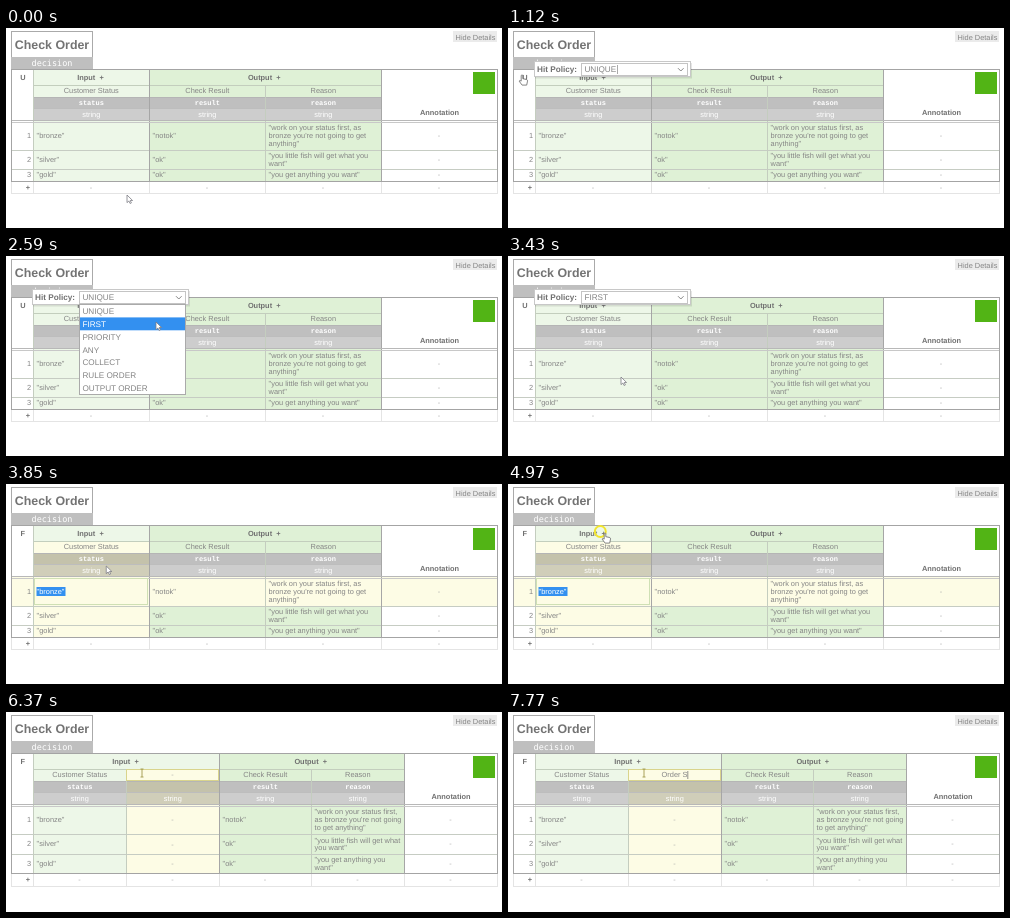
Animation, 496 px wide and 200 px high, one loop 8 s. Source, as an HTML page:

```html
<!DOCTYPE html>
<html lang="en">
<head>
<meta charset="utf-8">
<title>Decision table editor</title>
<style>
  html, body { margin: 0; width: 100%; height: 100%; overflow: hidden; background: #fff; }
  svg { display: block; width: 496px; height: 200px; }
  text { font: 7.4px "Liberation Sans", Arial, sans-serif; fill: #858585; text-rendering: geometricPrecision; white-space: pre; }
  .bold { font-weight: bold; fill: #707070; }
  .title { font-size: 12.4px; fill: #737373; }
  .big { font-size: 8.2px; }
  .mono { font: bold 7px "Liberation Mono", monospace; fill: #fff; }
  .tab { font: 8.5px "DejaVu Sans Mono", monospace; }
  .white { fill: #fff; }
  .faint { fill: #aaa; }
</style>
</head>
<body>
<svg id="stage" viewBox="0 0 496 200"></svg>
<script>
const LOOP = 8000, STEP = 70;
const GREEN_IN = '#edf7e8', GREEN_OUT = '#dff1d6', YELLOW = '#fdfce5';
const stage = document.getElementById('stage');
const pen = document.createElement('canvas').getContext('2d');
pen.font = '7.4px "Liberation Sans", Arial, sans-serif';

const rect = (x, y, x2, y2, fill, extra = '') =>
  `<rect x="${x}" y="${y}" width="${x2 - x}" height="${y2 - y}" fill="${fill}" ${extra}/>`;
const frame = (x, y, x2, y2, color, fill = 'none') =>
  rect(x + .5, y + .5, x2 + .5, y2 + .5, fill, `stroke="${color}"`);
const hLine = (x, x2, y, color) => rect(x, y, x2, y + 1, color);
const vLine = (x, y, y2, color) => rect(x, y, x + 1, y2, color);
const label = (x, y, text, cls = '', anchor = 'middle') =>
  `<text x="${x}" y="${y}" class="${cls}" text-anchor="${anchor}">${text}</text>`;

const input = (name, variable, cells) => ({ name, variable, cells, fill: GREEN_IN });
const output = (name, variable, cells) => ({ name, variable, cells, fill: GREEN_OUT });
const status = input('Customer Status', 'status', ['"bronze"', '"silver"', '"gold"']);
const result = output('Check Result', 'result', ['"notok"', '"ok"', '"ok"']);

const narrow = {
  edges: [27, 143, 259, 375, 491], rows: [93, 122, 141, 153], foot: 165, inputs: 1,
  columns: [status, result, output('Reason', 'reason', [
    '"work on your status first, as|bronze you\'re not going to get|anything"',
    '"you little fish will get what you|want"',
    '"you get anything you want"'])]
};
const wide = {
  edges: [27, 120, 213, 305, 398, 491], rows: [93, 122, 142, 161], foot: 174, inputs: 2,
  columns: [status, input('', '', ['-', '-', '-']), result, output('Reason', 'reason', [
    '"work on your status first,|as bronze you\'re not going|to get anything"',
    '"you little fish will get what|you want"',
    '"you get anything you|want"'])]
};

function cellText(x, x2, top, bottom, text) {
  const mid = (top + bottom) / 2;
  if (text === '-') return label((x + x2) / 2, mid + 2.6, '-', 'faint');
  const lines = text.split('|');
  return lines.map((line, i) =>
    label(x + 3.6, mid + 2.4 + (i - (lines.length - 1) / 2) * 7.6, line, '', 'start')).join('');
}

function drawTable(table, policy, focusCol, focusRow) {
  const { edges, rows, foot, columns, inputs } = table;
  const last = columns.length, bottom = rows[3], right = edges[last], split = edges[inputs];
  let out = rect(27, 41, split, 57, GREEN_IN) + rect(split, 41, right, 57, GREEN_OUT);

  columns.forEach((col, c) => {
    const lit = c === focusCol;
    out += rect(edges[c], 57, edges[c + 1], bottom, lit ? YELLOW : col.fill) +
      rect(edges[c], 69, edges[c + 1], 80, lit ? '#c4c2ab' : '#bfbfbf') +
      rect(edges[c], 80, edges[c + 1], 92, lit ? '#d0ceb9' : '#cdcdcd');
  });
  if (focusRow >= 0) out += rect(5, rows[focusRow], 491, rows[focusRow + 1], YELLOW);
  columns.forEach((col, c) => {
    const x = edges[c], x2 = edges[c + 1], mid = (x + x2) / 2 + .3;
    out += label(mid, 65.3, col.name) + label(mid, 77, col.variable, 'mono') + label(mid, 88.6, 'string', 'white');
    col.cells.forEach((text, r) => out += cellText(x, x2, rows[r], rows[r + 1], text));
  });

  out += hLine(27, right, 57, '#c3cebd') + hLine(27, right, 69, '#b5b5b5') + hLine(27, right, 80, '#bdbdbd');
  rows.slice(1, 3).forEach(y => out += hLine(5, 491, y, '#c6ccc3'));
  edges.forEach((x, i) => {
    const strong = i === inputs || i === last;
    out += vLine(x, i && !strong ? 57 : 41, bottom, strong ? '#a6a6a6' : '#c4cdbf');
    out += vLine(x, bottom, foot, '#e4e4e4');
  });
  out += hLine(5, 491, 92, '#b8b8b8') + hLine(5, 491, 94, '#c8c8c8');
  out += frame(5, bottom, 491, foot, '#e4e4e4') + frame(5, 41, 491, bottom, '#a4a4a4');

  out += label(16.8, 51.6, policy, 'bold');
  out += label((27 + split) / 2 - .5, 51.6, 'Input\u00a0\u00a0+', 'bold');
  out += label((split + right) / 2 - .8, 51.6, 'Output\u00a0\u00a0+', 'bold');
  const noteX = (right + 491) / 2;
  out += label(noteX + .5, 87.4, 'Annotation', 'bold') + rect(467, 44, 489, 66, '#52b415');
  for (let r = 0; r < 3; r++) {
    const y = (rows[r] + rows[r + 1]) / 2 + 2.4;
    out += label(25, y, r + 1, '', 'end') + label(noteX, y, '-', 'faint');
  }
  const footY = (bottom + foot) / 2 + 2.6;
  out += label(22, footY, '+', 'bold');
  [...edges.slice(1), 491].forEach((x2, i) => {
    if (x2 > edges[i]) out += label((edges[i] + x2) / 2, footY, '-', 'faint');
  });
  return out;
}

function drawHeader() {
  return frame(5, 3, 86, 29, '#aaa', '#fff') + label(46, 21.1, 'Check Order', 'bold title') +
    rect(5, 29, 87, 41, '#bfbfbf') + label(46, 38.2, 'decision', 'mono tab') +
    rect(447, 3, 491, 14, '#ebebeb') + label(469.5, 11.6, 'Hide Details');
}

const policies = ['UNIQUE', 'FIRST', 'PRIORITY', 'ANY', 'COLLECT', 'RULE ORDER', 'OUTPUT ORDER'];
function drawPopup(t) {
  let out = rect(27, 35, 184, 50.5, '#000', 'opacity=".1"') + frame(26, 33, 182, 48, '#c8c8c8', '#fff') +
    label(29, 44.2, 'Hit Policy:', 'bold big', 'start') + frame(73, 35, 179, 47, '#c4c4c4', '#fff') +
    label(76.4, 44.2, t < 2800 ? 'UNIQUE' : 'FIRST', 'big', 'start') +
    '<path d="M170 40.2l2.8 2.8 2.8-2.8" fill="none" stroke="#888"/>';
  if (t < 1550) out += vLine(109, 37, 46, '#aaa');
  if (t >= 2240 && t < 2800) {
    const hover = t < 2450 ? 0 : 1;
    out += frame(73, 48, 179, 138, '#aaa', '#fff');
    policies.forEach((name, i) => {
      const y = 48.5 + i * 12.9;
      if (i === hover) out += rect(74, y, 179, y + 12.9, '#3390f0');
      out += label(76.4, y + 9.3, name, i === hover ? 'big white' : 'big', 'start');
    });
  }
  return out;
}

// time, x, y of the pointer tip
const path = [
  [0, 121, 167], [840, 14, 47], [1260, 14, 47], [1960, 171, 42], [2240, 171, 42], [2590, 150, 66],
  [3080, 150, 66], [3430, 113, 121], [3570, 111, 108], [3920, 99, 79], [4300, 88, 43], [4550, 95, 47],
  [4690, 95, 47], [4760, 97, 49], [5250, 97, 49], [5670, 136, 61], [LOOP, 136, 61]
];
function pointerAt(t) {
  const i = path.findIndex(p => p[0] > t);
  const [t0, x0, y0] = path[i - 1], [t1, x1, y1] = path[i];
  const k = (t - t0) / (t1 - t0), e = k * k * (3 - 2 * k);
  return [x0 + (x1 - x0) * e, y0 + (y1 - y0) * e];
}

const shapes = {
  arrow: '<path d="M0 0v7.6l1.9-1.6 1.2 2.5 1.3-.6-1.2-2.4h2.4z" fill="#fff" stroke="#7d7d85" stroke-width=".8"/>',
  hand: '<path d="M-.8 .4q.8-1 1.6 0v3.3l4 .8q.8.4.7 1.6l-.8 4h-4.6l-3-4q.4-1.2 2.1 0z" fill="#fff" stroke="#666" stroke-width=".8"/>',
  beam: '<path d="M-1.5-4h3M0-4v8M-1.5 4h3" fill="none" stroke="#a0984a" stroke-width=".9"/>'
};
// first moment each pointer shape is used
const shapeTimes = [[0, 'arrow'], [770, 'hand'], [1330, 'arrow'], [1890, 'hand'], [2310, 'arrow'],
  [4690, 'hand'], [5390, 'arrow'], [5600, 'beam']];
const typing = [[6860, 'O'], [7070, 'Or'], [7210, 'Ord'], [7280, 'Orde'], [7350, 'Order'],
  [7490, 'Order '], [7770, 'Order S']];
const clicks = [1190, 2170, 2730, 3570, 4970, 5880];
const latest = (list, t) => (list.filter(s => s[0] <= t).pop() || [])[1];

function drawEditor(t) {
  const typed = latest(typing, t);
  let out = frame(120, 57, 212, 68, '#d9d48c', YELLOW);
  if (!typed) return out + label(166.5, 65.3, '-', 'faint');
  const shown = typed.trim();
  const caret = 166.5 + pen.measureText(shown).width / 2 + (shown === typed ? 0 : 2);
  return out + label(166.5, 65.3, shown) + rect(caret, 59, caret + .8, 67, '#777');
}

function drawPointer(t) {
  const [x, y] = pointerAt(t), click = clicks.find(c => t >= c && t < c + 2 * STEP);
  const ring = click === undefined ? '' :
    `<circle cx="${x - 4.7}" cy="${y - 1.5}" r="${5.5 + (t - click) / STEP * 4}" fill="none" stroke="#f2e530" stroke-width="2"/>`;
  return ring + `<g transform="translate(${x} ${y})">${shapes[latest(shapeTimes, t)]}</g>`;
}

function drawScene(t) {
  const editing = t >= 3570 && t < 5040, isWide = t >= 5040;
  let out = drawHeader();
  if (isWide) out += drawTable(wide, 'F', t >= 5950 ? 1 : -1, -1);
  else out += drawTable(narrow, t < 3570 ? 'U' : 'F', editing ? 0 : -1, editing ? 0 : -1);
  if (isWide && t < 6300) out += label(166.5, 65.3, '-', 'faint');
  if (t >= 6300) out += drawEditor(t);
  if (editing) {
    out += frame(28, 94, 141, 120, '#cfe0b4', YELLOW) + rect(30.5, 103, 59.5, 112, '#3390f0') +
      label(30.6, 109.9, '"bronze"', 'white', 'start');
  }
  if (t >= 1050 && t < 3570) out += drawPopup(t);
  return out + drawPointer(t);
}

let start, shownStep = -1;
function tick(now) {
  start ??= now;
  const t = Math.floor(((now - start) % LOOP) / STEP) * STEP;
  if (t !== shownStep) {
    stage.innerHTML = drawScene(t);
    shownStep = t;
  }
  requestAnimationFrame(tick);
}
stage.innerHTML = drawScene(0);
requestAnimationFrame(tick);
</script>
</body>
</html>
```
